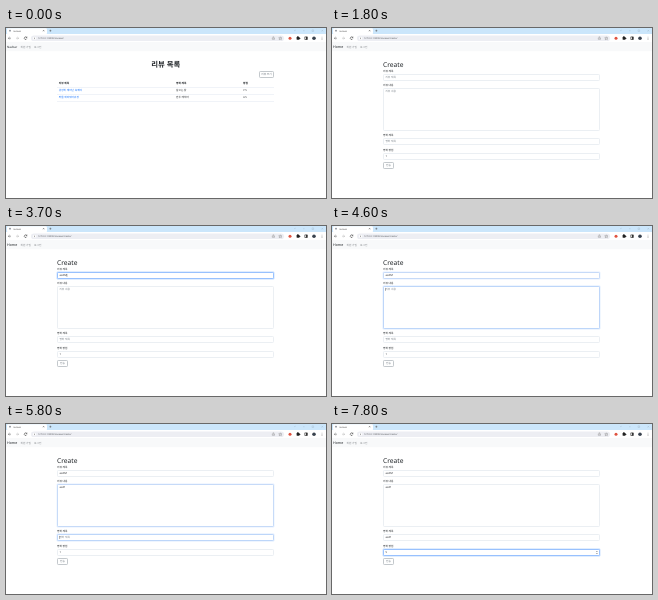
Recreate the animation shown at these times as an HTML page. Size 320 by 170 pixels, loop 8000 ms.

```html
<!DOCTYPE html>
<html lang="ko">
<head>
<meta charset="utf-8">
<title>reviews</title>
<style>
  html, body { margin: 0; width: 100%; height: 100%; overflow: hidden; background: #fff; }
  svg { display: block; width: 100vw; height: 100vh; }
  text {
    font-family: "Noto Sans", "Noto Sans CJK KR", "Noto Sans CJK", sans-serif;
    font-size: 2.67px; fill: #212529; text-rendering: geometricPrecision;
  }
</style>
</head>
<body>
<svg id="stage" viewBox="0 0 320 170"></svg>
<script>
const LOOP = 8000, STEP = 100, FADE = 150;
const INK = '#212529', GRAY = '#6c757d', LINE = '#e6ebf0', BLUE = '#0d6efd';
const stage = document.getElementById('stage');

function add(parent, tag, attrs, str) {
  const el = document.createElementNS('http://www.w3.org/2000/svg', tag);
  for (const k in attrs) el.setAttribute(k, attrs[k]);
  if (str !== undefined) el.textContent = str;
  parent.appendChild(el);
  return el;
}
const label = (g, x, y, str, style = '') => add(g, 'text', { x, y, style }, str);
const path = (g, d, stroke = '#555', width = 0.5) =>
  add(g, 'path', { d, stroke, fill: 'none', 'stroke-width': width });
const rect = (g, x, y, width, height, fill, rx = 0) =>
  add(g, 'rect', { x, y, width, height, fill, rx });
const dot = (g, cx, cy, r, fill) => add(g, 'circle', { cx, cy, r, fill });
const frame = (g, x, y, w, h, stroke) => {
  const el = rect(g, x + 0.5, y + 0.5, w - 1, h - 1, '#fff', 0.8);
  el.setAttribute('stroke', stroke);
  el.setAttribute('stroke-width', 0.8);
  return el;
};

// Browser window
const win = add(stage, 'g', {});
rect(win, 0, 0, 320, 6, '#cbe6fb');
rect(win, 1, 0.3, 40, 6, '#fff', 1.4);
dot(win, 4, 2.7, 0.9, '#8a8f98');
label(win, 7, 3.5, 'reviews', 'font-size:2.3px;fill:#555');
path(win, 'M37 2.1l1.2 1.2M38.2 2.1l-1.2 1.2M43.4 2.7h2M44.4 1.7v2');
path(win, 'M288 2l.9 .9 .9-.9M297 2.7h1.6M306 1.9h1.6v1.6h-1.6zM315.5 1.9l1.6 1.6M317.1 1.9l-1.6 1.6', '#8fa3b3', 0.25);
rect(win, 0, 6, 320, 8, '#fff');
path(win, 'M5 10.2H2.4M3.6 9l-1.2 1.2 1.2 1.2');
path(win, 'M10 10.2h2.6M11.4 9l1.2 1.2-1.2 1.2', '#aaa');
path(win, 'M20.7 9.5a1.3 1.3 0 1 0 .1 1.2M20.9 8.6v1.1h-1.1', '#444', 0.6);
rect(win, 25, 7.4, 253, 5.7, '#edeef3', 2.85);
dot(win, 28.5, 10.2, 1.5, '#fff');
path(win, 'M28.5 9.3v.4M28.5 10v1.1', '#555', 0.5);
path(win, 'M266.3 9.8v1.5h2.2v-1.5M267.4 10.6V8.8M266.7 9.4l.7-.7.7.7M274.3 8.8l.5 1 1.1.1-.8.7.2 1.1-1-.6-1 .6.2-1.1-.8-.7 1.1-.1z', '#666', 0.35);
dot(win, 284, 10.2, 1.5, '#e0523f');
rect(win, 290.6, 9.1, 2.9, 2.6, '#222', 0.4);
dot(win, 291.9, 8.8, 0.7, '#222');
dot(win, 293.7, 10.4, 0.7, '#222');
path(win, 'M298.8 8.9h2.5v2.6h-2.5z', '#222', 0.6);
rect(win, 300.1, 8.9, 1.2, 2.6, '#222');
dot(win, 308, 10.2, 1.8, '#39424e');
for (const y of [9, 10.2, 11.4]) dot(win, 316, y, 0.35, '#555');
rect(win, 0, 14, 320, 9.2, '#f8f9fa');
const url = label(win, 32, 11.1, '', 'font-size:2.33px;fill:#55585e');
const brand = label(win, 1, 19.9, '', 'font-size:3.2px');
label(win, 14.5, 19.8, '회원 가입', 'fill:#85898d');
label(win, 28, 19.8, '로그인', 'fill:#85898d');

// Review list
const list = add(stage, 'g', {});
label(list, 159.8, 38.5, '리뷰 목록', 'font-size:7.4px;font-weight:700;text-anchor:middle');
const newBtn = frame(list, 253, 43, 15, 7, '#b4babf');
const newText = label(list, 260.5, 47.4, '리뷰 쓰기', 'font-size:2.67px;text-anchor:middle');
const cols = [52.7, 170, 237];
const rows = [
  ['리뷰 제목', '영화 제목', '평점'],
  ['굉장히 재미난 축제여', '날으는 닭', '7.5'],
  ['와들 재미있어유정', '만두 캐릭터', '4.5']
];
rows.forEach((row, r) => {
  row.forEach((str, c) => label(list, cols[c], 56.3 + r * 7, str,
    r ? 'fill:' + (c ? INK : BLUE) : 'font-weight:700'));
  rect(list, 51, 59 + r * 7, 217, 0.6, '#e6ecf3');
});

// Review form
const form = add(stage, 'g', {});
label(form, 51, 38.6, 'Create', 'font-size:6.67px;font-weight:500');

// [label, top, height, placeholder, focus time, blur time, typed [time, text]...]
const fields = [
  ['리뷰 제목', 46, 7, '리뷰 제목', 2790, 4550,
    [[3500, 'as'], [3600, 'asdf'], [3700, 'asdfsf']]],
  ['리뷰 내용', 60, 43, '리뷰 내용', 4550, 5750,
    [[5100, 'a'], [5200, 'asd'], [5300, 'asdf']]],
  ['영화 제목', 110, 7, '영화 제목', 5750, 6450,
    [[6000, 'a'], [6100, 'as'], [6200, 'asd'], [6300, 'asdf']]],
  ['영화 평점', 125, 7, '', 6450, LOOP + FADE,
    [[0, '1'], [6800, ''], [6900, '5']]]
].map(([name, y, h, hint, on, off, typed]) => {
  label(form, 51, y - 2, name);
  const ring = rect(form, 50.6, y - 0.4, 217.8, h + 0.8, '#c2dbfe', 1.2);
  const box = frame(form, 51, y, 217, h, LINE);
  const value = label(form, 53.4, y + 4.4, hint);
  const caret = rect(form, 53.3, y + 1.9, 0.35, 3, INK);
  return { y, hint, on, off, typed, ring, box, value, caret };
});
const spin = path(form, 'M264.2 128l.7-.8.7.8M264.2 129.2l.7.8.7-.8', '#555', 0.5);
frame(form, 51, 134, 11, 7, '#b4babf');
label(form, 56.5, 138.4, '전송', 'font-size:2.67px;text-anchor:middle;fill:' + GRAY);

const clamp = p => Math.max(0, Math.min(1, p));
const fade = (t, start) => 1 - (1 - clamp((t - start) / FADE)) ** 2;
function mix(a, b, p) {
  const ch = (s, i) => parseInt(s.slice(1 + i * 2, 3 + i * 2), 16);
  return 'rgb(' + [0, 1, 2].map(i => Math.round(ch(a, i) + (ch(b, i) - ch(a, i)) * p)) + ')';
}

function drawField(f, t) {
  const glow = fade(t, f.on) - fade(t, f.off);
  f.ring.setAttribute('opacity', glow);
  f.box.setAttribute('stroke', mix(LINE, '#86b7fe', glow));

  let str = '', last = f.on;
  for (const [at, s] of f.typed) if (t >= at) { str = s; last = Math.max(last, at); }
  f.value.textContent = str || f.hint;
  f.value.style.fill = str ? INK : '#7d858c';

  const active = t >= f.on && t < f.off;
  const lit = Math.floor((t - Math.ceil(last / STEP) * STEP) / 500) % 2 === 0;
  f.caret.setAttribute('visibility', active && lit ? 'inherit' : 'hidden');
  f.caret.setAttribute('x', 53.3 + (str ? f.value.getComputedTextLength() : 0));
}

function draw(time) {
  const t = Math.floor((time % LOOP) / STEP) * STEP;
  const creating = t >= 1600;
  list.style.display = creating ? 'none' : '';
  form.style.display = creating ? '' : 'none';
  url.textContent = '127.0.0.1:8000/reviews/' + (creating ? 'create/' : '');
  brand.textContent = creating ? 'Home' : 'Navbar';
  brand.style.fontSize = creating ? '3.6px' : '3px';

  const hover = fade(t, 1370);
  newBtn.setAttribute('fill', mix('#ffffff', GRAY, hover));
  newBtn.setAttribute('stroke', mix('#b4babf', GRAY, hover));
  newText.style.fill = mix(GRAY, '#ffffff', hover);

  if (creating) fields.forEach(f => drawField(f, t));
  spin.setAttribute('visibility', t >= 6500 ? 'inherit' : 'hidden');
}

const begin = performance.now();
function tick() {
  draw(performance.now() - begin);
  requestAnimationFrame(tick);
}
tick();
</script>
</body>
</html>
```
